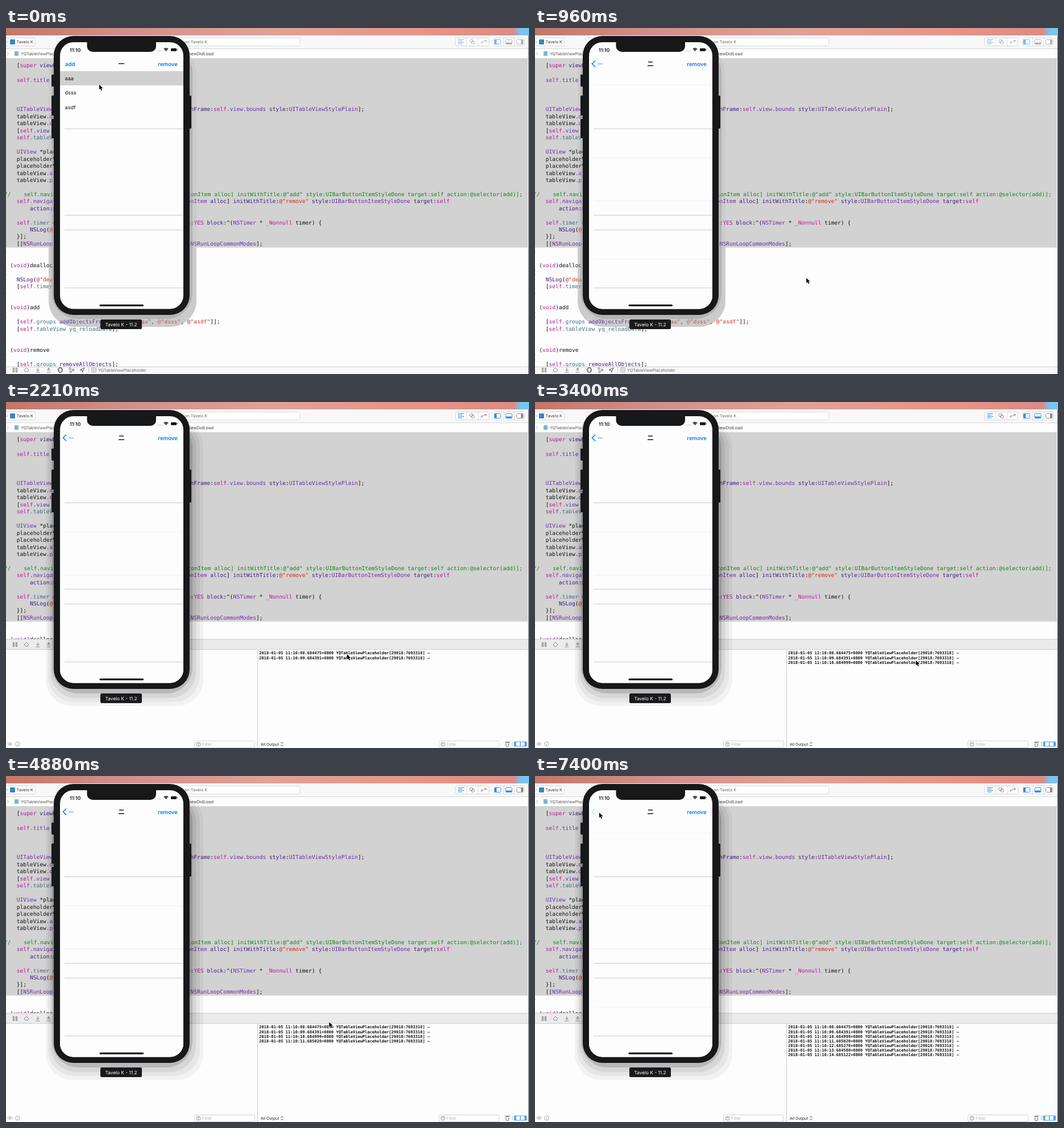
Write an HTML page with a canvas that moves like this. It is 920 px wide and 609 px high and loops after 8000 ms.

```html
<!DOCTYPE html>
<html lang="en">
<head>
<meta charset="utf-8">
<title>Table view placeholder demo</title>
<style>
html, body { margin: 0; width: 100%; height: 100%; overflow: hidden; background: #fff; }
canvas { display: block; }
</style>
</head>
<body>
<canvas id="stage" width="920" height="609"></canvas>
<script>
const ctx = document.getElementById('stage').getContext('2d');
ctx.textRendering = 'geometricPrecision';

const LOOP = 8000, PUSH_AT = 150, CONSOLE_AT = 1050, TAP_AT = 7400;
const SANS = 'Inter, Roboto, sans-serif';
const MONO = '"DejaVu Sans Mono", monospace';
const CJK = '"Noto Sans CJK SC", "Noto Sans CJK JP", sans-serif';
const BLUE = '#0a7cf5', GRAY = '#8a8a8a', PAPER = '#fdfdfd', BODY = '#17181a';
const DEVICE = 'Tavelo K', PROJECT = 'YQTableViewPlaceholder';

// [centre y, column, text]
const CODE = [
  [66, 0, '[super viewDidLoad];'],
  [92, 0, 'self.title = @"一";'],
  [143, 0, 'UITableView *tableView = [[UITableView alloc] initWithFrame:self.view.bounds style:UITableViewStylePlain];'],
  [156, 0, 'tableView.dataSource = self;'],
  [168, 0, 'tableView.delegate = self;'],
  [181, 0, '[self.view addSubview:tableView];'],
  [193, 0, 'self.tableView = tableView;'],
  [218, 0, 'UIView *placeholderView = [[UIView alloc] init];'],
  [231, 0, 'placeholderView.frame = tableView.bounds;'],
  [243, 0, 'placeholderView.backgroundColor = UIColor.whiteColor;'],
  [256, 0, 'tableView.allowsSelection = YES;'],
  [268, 0, 'tableView.placeholderView = placeholderView;'],
  [293, -3.8, '//    self.navigationItem.leftBarButtonItem = [[UIBarButtonItem alloc] initWithTitle:@"add" style:UIBarButtonItemStyleDone target:self action:@selector(add)];'],
  [305, 0, 'self.navigationItem.rightBarButtonItem = [[UIBarButtonItem alloc] initWithTitle:@"remove" style:UIBarButtonItemStyleDone target:self'],
  [318, 4, 'action:@selector(remove)];'],
  [343, 0, 'self.timer = [NSTimer timerWithTimeInterval:1 repeats:YES block:^(NSTimer * _Nonnull timer) {'],
  [355, 4, 'NSLog(@"一");'],
  [367, 0, '}];'],
  [380, 0, '[[NSRunLoop mainRunLoop] addTimer:self.timer forMode:NSRunLoopCommonModes];'],
  [393, -4, '}'],
  [418, -4, '- (void)dealloc'],
  [430, -4, '{'],
  [443, 0, 'NSLog(@"dealloc");'],
  [455, 0, '[self.timer invalidate];'],
  [467, -4, '}'],
  [492, -4, '- (void)add'],
  [505, -4, '{'],
  [517, 0, '[self.groups addObjectsFromArray:@[@"aaa", @"dsss", @"asdf"]];'],
  [530, 0, '[self.tableView yq_reloadData];'],
  [542, -4, '}'],
  [567, -4, '- (void)remove'],
  [580, -4, '{'],
  [592, 0, '[self.groups removeAllObjects];']
];

// Alternatives in the order of TOKEN_COLORS, the last one being plain text.
const TOKEN = /(@"[^"]*")|(\b(?:self|super|void|YES|_Nonnull)\b|@selector)|(\.(?:timer|tableView|groups)\b|yq_\w+)|(\b(?:UI|NS(?!Log))\w+|\.\w+)|(NSLog|viewDidLoad|\b\w+(?=[:\]]))|(\w+|[^\w\s]+?)/g;
const TOKEN_COLORS = ['#d12f1b', '#b5199c', '#3f6e84', '#6a2fa6', '#3f1a83', '#111'];

const LOGS = ['08.684475', '09.684391', '10.684999', '11.685020', '12.685270', '13.684580', '14.685122'];

// Pointer tip: [ms, x, y]
const POINTER = [
  [0, 164, 99.5], [150, 164, 99.5], [360, 166, 102.5], [1110, 513, 478.5],
  [1700, 545, 482], [2210, 600, 444], [3400, 670, 454.5], [4590, 668, 453],
  [4880, 568.5, 433], [5760, 111.5, 86], [6350, 113, 64.5], [LOOP, 113, 64.5]
];

function rect(x, y, w, h, color) {
  ctx.fillStyle = color;
  ctx.fillRect(x, y, w, h);
}

function box(x, y, w, h, r, fill, stroke) {
  ctx.beginPath();
  ctx.roundRect(x, y, w, h, r);
  if (fill) { ctx.fillStyle = fill; ctx.fill(); }
  if (stroke) { ctx.strokeStyle = stroke; ctx.lineWidth = 1; ctx.stroke(); }
}

function poly(points, color, width = 1) {
  ctx.beginPath();
  points.forEach(([x, y]) => ctx.lineTo(x, y));
  ctx.strokeStyle = color;
  ctx.lineWidth = width;
  ctx.stroke();
}

function ring(x, y, r, color, width = 1, from = 0, to = Math.PI * 2) {
  ctx.beginPath();
  ctx.arc(x, y, r, from, to);
  ctx.strokeStyle = color;
  ctx.lineWidth = width;
  ctx.stroke();
}

function label(text, x, y, size, color, { weight = 400, align = 'left', family = SANS } = {}) {
  ctx.font = `${weight} ${size}px ${family}`;
  ctx.textAlign = align;
  ctx.fillStyle = color;
  ctx.fillText(text, x, y);
}

function codeLine(y, column, text) {
  const x = column === -4 ? -4.2 : 18.8 + column * 5.77;
  const comment = text.startsWith('//');
  for (const m of text.matchAll(TOKEN)) {
    const kind = m.slice(1).findIndex(Boolean);
    label(m[0], x + m.index * 5.77, y + 3.4, 9.585, comment ? '#16801d' : TOKEN_COLORS[kind], { family: MONO });
  }
}

function panelIcon(x, y, side, color) {
  box(x - 5.5, y - 4, 11, 8, 1, null, color);
  if (side === 'left') rect(x - 5, y - 4, 3, 8, color);
  if (side === 'right') rect(x + 2, y - 4, 3, 8, color);
  if (side === 'bottom') rect(x - 5, y + 1, 10, 3, color);
}

function toolbarIcons(open) {
  box(790.5, 17.5, 59, 14, 3, '#fff', '#d5d5d5');
  rect(810, 18, 1, 13, '#ddd');
  rect(830, 18, 1, 13, '#ddd');
  box(858.5, 17.5, 53, 14, 3, '#fff', '#d5d5d5');
  rect(875, 18, 1, 13, '#ddd');
  rect(894, 18, 1, 13, '#ddd');

  ctx.globalAlpha = open ? 1 : .65;   // dimmed while the window is inactive
  for (let i = 0; i < 4; i++) rect(795, 20 + i * 2.5, i % 2 ? 8 : 11, 1, '#2d8cf0');
  ring(818.5, 23, 2.8, GRAY);
  ring(821.5, 25.5, 2.8, GRAY);
  poly([[836, 26], [845, 22]], GRAY);
  poly([[842, 21], [845, 22], [844, 25]], GRAY);
  poly([[838, 28], [835.5, 26], [837.5, 23.5]], GRAY);
  panelIcon(865, 24.5, 'left', '#2d8cf0');
  panelIcon(884.5, 24.5, 'bottom', open ? '#2d8cf0' : GRAY);
  panelIcon(904, 24.5, 'right', GRAY);
  ctx.globalAlpha = 1;
}

function drawChrome(open) {
  const sky = ctx.createLinearGradient(0, 0, 920, 0);
  [[0, '#c2776a'], [.2, '#cf8d87'], [.5, '#e0a198'], [.8, '#e59587'], [.97, '#da8b86'], [.985, '#76c6f0'], [1, '#76c6f0']]
    .forEach(([at, color]) => sky.addColorStop(at, color));
  rect(0, 0, 920, 609, '#5a5560');
  rect(0, 0, 920, 13, sky);
  rect(0, 13, 919, 24, '#f8f8f8');
  rect(0, 37, 919, 572, PAPER);
  rect(0, 36, 919, 1, '#d6d6d6');
  rect(0, 53, 919, 1, '#d8d8d8');

  box(-6, 17.5, 57.5, 14, 3, '#fff', '#d5d5d5');
  poly([[1, 22], [3, 24.5], [1, 27]], '#aaa');
  box(7, 20, 9, 9, 1, '#3a86c8');
  label(DEVICE, 18.5, 27, 7.3, '#333');
  box(90, 17.5, 427, 14, 3, '#fff', '#dcdcdc');
  label('on ' + DEVICE, 314, 27, 7.3, '#666');
  toolbarIcons(open);

  poly([[2, 42], [4.5, 45], [2, 48]], '#bbb');
  box(15, 41, 7, 8, 1, '#78b4e4');
  label(PROJECT, 26, 47.7, 7.2, '#555');
  label('-viewDidLoad', 365, 47.7, 7.5, '#444', { align: 'right' });

  rect(0, 54, 918, 332.5, '#d2d2d2');
}

function debugBar(top, height, y, color) {
  rect(0, top, 919, height, color);
  rect(0, top, 919, 1, '#cfcfcf');
  box(12.5, y - 3.5, 2, 7, 0, null, '#777');
  box(17.5, y - 3.5, 2, 7, 0, null, '#777');
  poly([[32, y], [36, y - 4], [40, y], [38, y + 3], [34, y + 3], [32, y]], GRAY);
  [[56, 1], [75, -1]].forEach(([x, dir]) => {
    poly([[x, y - 4], [x, y + 2]], GRAY);
    poly([[x - 2.5, y - dir], [x, y + dir * 2 - (dir < 0 ? 2 : 0)], [x + 2.5, y - dir]], GRAY);
    poly([[x - 3.5, y + 4], [x + 3.5, y + 4]], GRAY);
  });
  box(93, y - 4, 5, 8, 1, null, '#555');
  ring(95.5, y, 4, '#555');
  ring(112.5, y - 2.5, 1.6, '#666');
  ring(118, y, 1.6, '#666');
  ring(113.5, y + 3, 1.6, '#666');
  poly([[130, y], [138, y - 4], [134.5, y + 4], [134, y], [130, y]], '#555');
  rect(145, y - 5, 1, 10, '#ccc');
  box(150.5, y - 4, 8, 8, 1, '#ddd', '#bbb');
  label(PROJECT, 162, y + 2.6, 7.2, '#666');
}

function filterField(x) {
  box(x + .5, 596.5, 106, 12, 2.5, '#fff', '#d2d2d2');
  ring(x + 7.5, 602.5, 3.5, '#999');
  poly([[x + 5.5, 601], [x + 9.5, 601]], '#999');
  poly([[x + 6.5, 603.5], [x + 8.5, 603.5]], '#999');
  label('Filter', x + 14, 605, 7.4, '#b2b2b2');
}

function drawConsole(t) {
  rect(0, 417, 919, 192, PAPER);
  debugBar(417, 19, 427, '#ebebeb');
  rect(0, 435, 919, 1, '#cfcfcf');
  rect(442, 436, 1, 173, '#c8c8c8');
  const count = 1 + Math.floor((t - CONSOLE_AT) / 1000);
  LOGS.slice(0, count).forEach((stamp, i) => {
    const line = `2018-01-05 11:10:${stamp}+0800 ${PROJECT}[29018:7693318] —`;
    for (const m of line.matchAll(/\S+/g))
      label(m[0], 445.3 + m.index * 4.23, 444.4 + i * 8.15, 7.03, '#111', { weight: 700, family: MONO });
  });
  ctx.save();
  ctx.scale(1, .6);
  ring(7, 1003, 4, '#aaa');
  ctx.restore();
  ring(7, 602, 1.3, '#aaa');
  ring(20.5, 602, 3.8, '#aaa');
  rect(20, 601, 1, 3, '#aaa');
  filterField(331);
  filterField(761);
  label('All Output', 448, 604.6, 6.9, '#222');
  poly([[483.5, 601], [485.5, 599], [487.5, 601]], '#333');
  poly([[483.5, 603.5], [485.5, 605.5], [487.5, 603.5]], '#333');
  box(879.5, 599.5, 5, 7, 1, null, '#777');
  poly([[878, 598.5], [887, 598.5]], '#777');
  rect(890, 598, 1, 8, '#bbb');
  panelIcon(899.5, 602, 'left', '#4aa0f2');
  panelIcon(910, 602, 'right', '#4aa0f2');
}

function rules(rows, x, color) {
  rows.forEach(y => rect(x + 103, y, 210, 1, color));
}

function separators(x, faintest) {
  rules([177, 329, 355, 457], x, '#cacaca');
  rules([228, 304], x, '#ededed');
  if (faintest) rules([100, 406], x, '#f4f4f4');
}

function navBar(t, progress) {
  ctx.globalAlpha = 1 - progress;
  label('add', 104, 66.6, 9.6, BLUE, { weight: 600 });
  label('一', 203 - 70 * progress, 67, 11, '#111', { weight: 700, align: 'center', family: CJK });

  ctx.globalAlpha = progress * (t >= TAP_AT ? .22 : 1);
  const shift = (1 - progress) * 40;
  poly([[106, 57.5], [100.5, 63], [106, 68.5]], BLUE, 1.7);
  label('一', 109.5 + shift, 66.8, 10, BLUE, { family: CJK });
  ctx.globalAlpha = progress;
  label('二', 203 + shift, 67, 11, '#111', { weight: 700, align: 'center', family: CJK });
  ctx.globalAlpha = 1;
  label('remove', 302, 66.6, 9.6, BLUE, { weight: 600, align: 'right' });
}

// Critically damped slide of the pushed screen.
function pushOffset(t) {
  if (t < PUSH_AT) return 217;
  if (t > 700) return 0;
  const s = (t - 60) * .0187;
  return 217 * (1 + s) * Math.exp(-s);
}

function drawScreen(t) {
  const offset = pushOffset(t), progress = 1 - offset / 217;
  ctx.save();
  box(95, 25, 217, 469.5, 23.5, PAPER);
  ctx.clip();
  if (offset > 0) {
    const x = -65 * progress;
    rect(95 + x, 76, 217, 25, '#d0d0d0');
    ['aaa', 'dsss', 'asdf'].forEach((text, i) => label(text, 103.5 + x, 92 + i * 25.46, 9.2, '#111'));
    rules([177, 329, 355, 457], x, '#cacaca');
    rect(95, 76, 217, 420, `rgba(0,0,0,${.04 * progress})`);
  }
  rect(95 + offset, 76, 217, 420, PAPER);
  if (offset < 217) separators(offset, t < CONSOLE_AT || t > 5760);
  navBar(t, progress);

  label('11:10', 112, 41.5, 8.6, '#111', { weight: 600 });
  for (let i = 0; i < 4; i++) rect(266 + i * 2.4, 40, 1.2, 1, '#999');
  [1.2, 3.2, 5.2].forEach(r => ring(281.5, 41, r, '#111', 1.4, -Math.PI * .75, -Math.PI * .25));
  box(290, 35.8, 10, 5, 1.3, '#111');
  rect(300.7, 37.3, 1, 2, '#111');
  box(164.5, 486.7, 77.5, 3, 1.5, '#000');
  ctx.restore();
  box(142.5, 20, 121.5, 22, [0, 0, 10, 10], BODY);
}

function drawShadow(open) {
  // [left, right, bottom, fill]
  const layers = open
    ? [[70, 347, 535, 'rgba(0,0,0,.045)'], [74, 341, 528, 'rgba(0,0,0,.05)'],
       [78, 334, 521, 'rgba(0,0,0,.07)'], [81, 328, 513, 'rgba(0,0,0,.14)']]
    : [[75, 335, 526, '#cbcbcb'], [80, 328, 512, '#b4b4b4']];
  ctx.globalCompositeOperation = open ? 'source-over' : 'darken';
  layers.forEach(([left, right, bottom, fill]) => box(left, 34, right - left, bottom - 34, 46, fill));
  ctx.globalCompositeOperation = 'source-over';
}

function drawPhone(t, open) {
  drawShadow(open);
  [[82, 21], [119, 35], [160, 34]].forEach(([y, h]) => box(80, y, 6, h, 1, BODY));
  box(321, 119, 5, 58, 1, BODY);
  box(84, 14, 239, 491, 34.5, BODY);
  drawScreen(t);
  box(166, 513, 73, 17, 2.5, '#1a1a1c');
  label(DEVICE + ' - 11.2', 202.5, 524.7, 8.3, '#fff', { align: 'center' });
}

function drawPointer(t) {
  const i = Math.max(1, POINTER.findIndex(key => key[0] > t));
  const [t0, x0, y0] = POINTER[i - 1], [t1, x1, y1] = POINTER[i];
  const u = (t - t0) / (t1 - t0), ease = u * u * (3 - 2 * u);
  ctx.save();
  ctx.translate(x0 + (x1 - x0) * ease, y0 + (y1 - y0) * ease);
  ctx.beginPath();
  [[0, 0], [0, 9], [2, 7.2], [3.6, 10.6], [5.1, 9.9], [3.6, 6.6], [6.4, 6.4]].forEach(p => ctx.lineTo(...p));
  ctx.closePath();
  ctx.strokeStyle = '#fff';
  ctx.lineWidth = 1.3;
  ctx.stroke();
  ctx.fillStyle = '#000';
  ctx.fill();
  ctx.restore();
}

function frame(now) {
  const t = now % LOOP, open = t >= CONSOLE_AT;
  drawChrome(open);
  CODE.forEach(line => codeLine(...line));
  if (open) drawConsole(t);
  else debugBar(596, 13, 602, '#f7f7f7');
  drawPhone(t, open);
  drawPointer(t);
  requestAnimationFrame(() => frame(performance.now()));
}
frame(performance.now());
</script>
</body>
</html>
```
